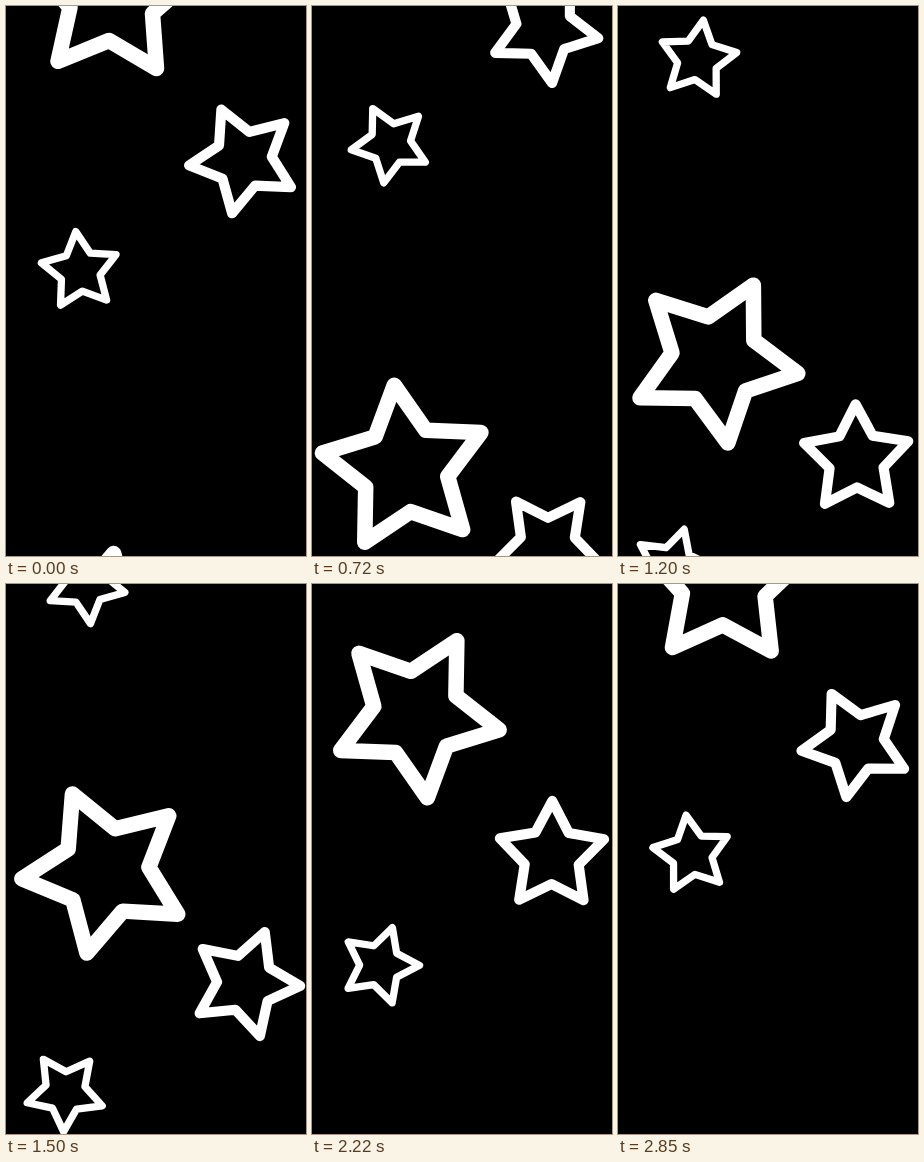
Write an HTML page that moves like this. It is 300 by 550 pixels and loops after 2880 ms.

```html
<!DOCTYPE html>
<html lang="en">
<head>
<meta charset="utf-8">
<title>Rising stars</title>
<style>
  html, body { margin: 0; width: 100%; height: 100%; overflow: hidden; background: #000; }
  svg { display: block; width: 300px; height: 550px; }
  path { fill: none; stroke: #fff; stroke-width: 15.5; stroke-linejoin: round; }
</style>
</head>
<body>
<svg viewBox="0 0 300 550"></svg>
<script>
const LOOP = 2880, STEP = 30, SPIN = 0.072;
const svg = document.querySelector('svg');

// Each star lives for up to two loops; t is its age in ms.
const stars = [
  {
    scale: 1,
    turn: 27.2 - SPIN * 1200,
    x: t => 97.4 + 8.8 * Math.sin((t - 1250) * 0.000987),
    y: t => 629.5 - 0.23537 * t + 4.76e-6 * t * t
  },
  {
    scale: 0.652,
    turn: -0.9 - SPIN * 1200,
    x: t => 240 - 2.8e-6 * (t - 1950) ** 2,
    y: t => 669.6 - 0.1795 * t + 1.2 * Math.sin((t - 2000) / 430)
  },
  {
    scale: 0.47,
    turn: 68.6 - SPIN * 1920,
    x: t => 80.2 - 2.33e-6 * (4500 - t) ** 2,
    y: t => 772.6 - 0.1763 * t
  }
];

function starPath(outer, inner) {
  const points = Array.from({ length: 10 }, (_, i) => {
    const r = i % 2 ? inner : outer, a = i * Math.PI / 5;
    return `${(r * Math.sin(a)).toFixed(2)},${(-r * Math.cos(a)).toFixed(2)}`;
  });
  return `M${points.join('L')}Z`;
}

function addPath() {
  const path = document.createElementNS('http://www.w3.org/2000/svg', 'path');
  path.setAttribute('d', starPath(84, 43.5));
  return svg.appendChild(path);
}

for (const star of stars) star.paths = [addPath(), addPath()];

function draw(time) {
  const now = Math.floor((time % LOOP) / STEP) * STEP;
  for (const star of stars) {
    star.paths.forEach((path, pass) => {
      const t = now + pass * LOOP;
      path.setAttribute('transform',
        `translate(${star.x(t)} ${star.y(t)}) rotate(${star.turn + SPIN * t}) scale(${star.scale})`);
    });
  }
}

let start;
function tick(time) {
  start ??= time;
  draw(time - start);
  requestAnimationFrame(tick);
}
draw(0);
requestAnimationFrame(tick);
</script>
</body>
</html>
```
